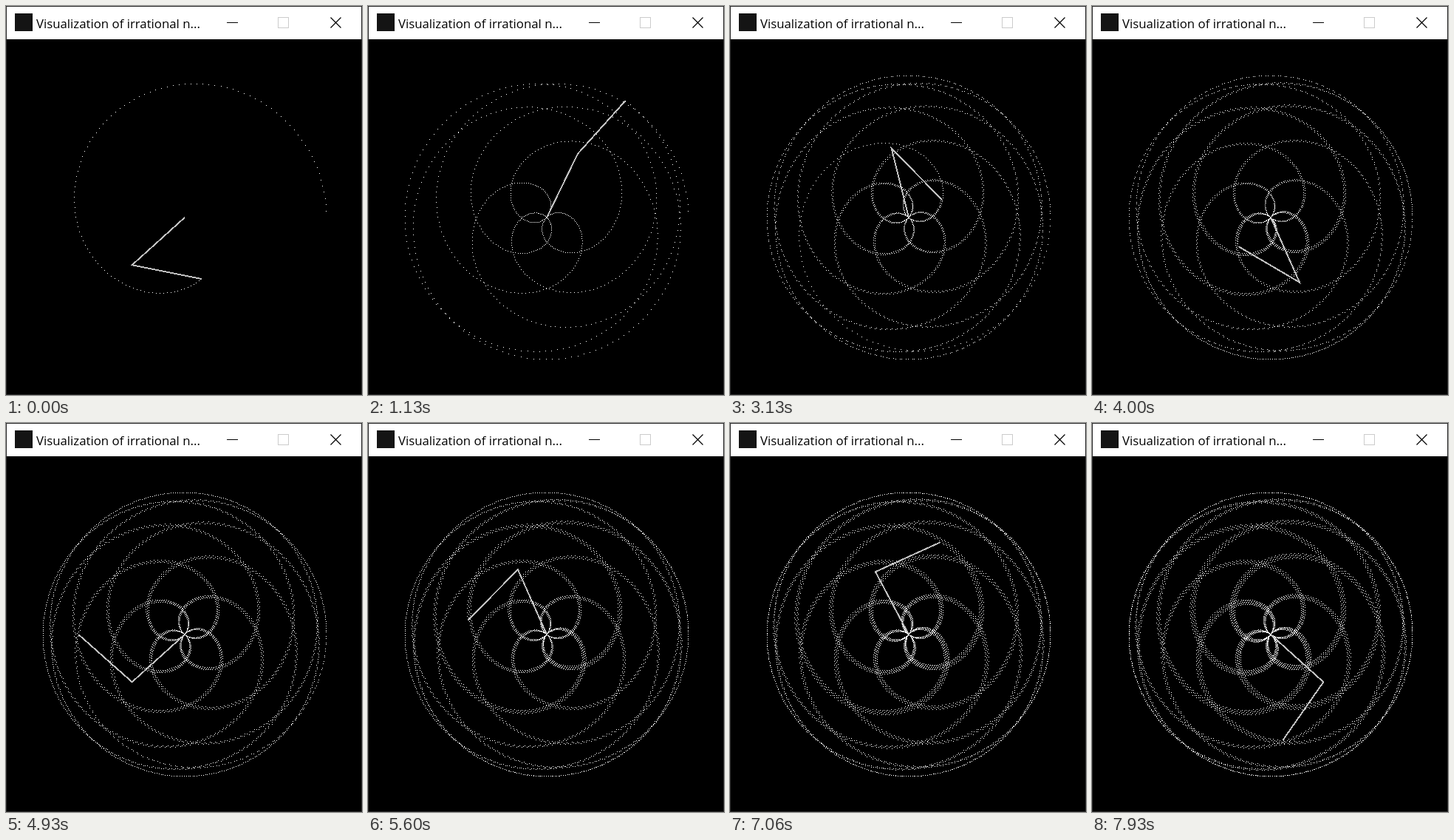
These frames come from a looping animation (482 px wide and 526 px high, 8 s). An HTML page with a canvas:

```html
<!DOCTYPE html>
<html lang="en">
<head>
<meta charset="utf-8">
<title>Visualization of irrational numbers</title>
<style>
  html, body { margin: 0; width: 100%; height: 100%; overflow: hidden; background: #000; }
  canvas, svg { position: absolute; left: 0; top: 0; width: 482px; height: 526px; display: block; }
  text { font: 16.8px "Open Sans", "Noto Sans", sans-serif; fill: #000; }
</style>
</head>
<body>
<canvas id="trace" width="482" height="526"></canvas>
<svg viewBox="0 0 482 526" width="482" height="526">
  <polyline id="arms" fill="none" stroke="#c0c0c0" stroke-width="2" shape-rendering="crispEdges"/>
  <rect x="1" y="1" width="480" height="44" fill="#fff"/>
  <rect x="12" y="10" width="24" height="24" fill="#141414"/>
  <text x="41" y="30">Visualization of irrational n...</text>
  <g fill="none" stroke="#000">
    <path d="M299 22.5H314"/>
    <rect x="368.5" y="15.5" width="14" height="14" stroke="#ccc"/>
    <path d="M439.5 15.5L453.5 29.5M453.5 15.5L439.5 29.5" stroke-width="1.2"/>
    <rect x="0.5" y="0.5" width="481" height="525" stroke="#2a2a2a"/>
  </g>
</svg>
<script>
const CX = 242, CY = 286, ARM = 96, LOOP = 8000;
const ctx = document.getElementById('trace').getContext('2d');
const arms = document.getElementById('arms');

// [tick, steps drawn so far]; the simulation runs at a slightly uneven pace
const PACE = [[0, 111], [17, 932], [29, 1470], [47, 2392], [74, 3711], [94, 4682], [117, 5826], [119, 5919]];

const rad = deg => deg * Math.PI / 180;

// The inner arm turns 2 degrees per step, the outer one pi degrees.
function pose(step) {
  const a = rad(2 * step), b = rad(Math.PI * step);
  const jx = CX + ARM * Math.cos(a), jy = CY - ARM * Math.sin(a);
  return { jx, jy, x: jx + ARM * Math.cos(b), y: jy - ARM * Math.sin(b) };
}

function stepsAt(tick) {
  const i = Math.max(1, PACE.findIndex(p => p[0] >= tick));
  const [t0, s0] = PACE[i - 1], [t1, s1] = PACE[i];
  return Math.round(s0 + (s1 - s0) * (tick - t0) / (t1 - t0));
}

// 15 ticks per second, each starting on a whole hundredth
const tickAt = ms => Math.ceil(3 * (Math.floor(ms / 10) + 1) / 20) - 1;

function draw(tick) {
  const steps = stepsAt(tick);
  ctx.fillStyle = '#000';
  ctx.fillRect(0, 0, 482, 526);
  ctx.fillStyle = '#fff';
  for (let n = 1; n <= steps; n++) {
    const p = pose(n);
    ctx.fillRect(Math.floor(p.x), Math.floor(p.y), 1, 1);
  }
  const { jx, jy, x, y } = pose(steps);
  arms.setAttribute('points', `${CX},${CY} ${jx},${jy} ${x},${y}`);
}

let start = null, shown = -1;
function loop(now) {
  if (start === null) start = now;
  const tick = tickAt(Math.max(0, now - start) % LOOP);
  if (tick !== shown) draw(shown = tick);
  requestAnimationFrame(loop);
}
draw(0);
requestAnimationFrame(loop);
</script>
</body>
</html>
```
